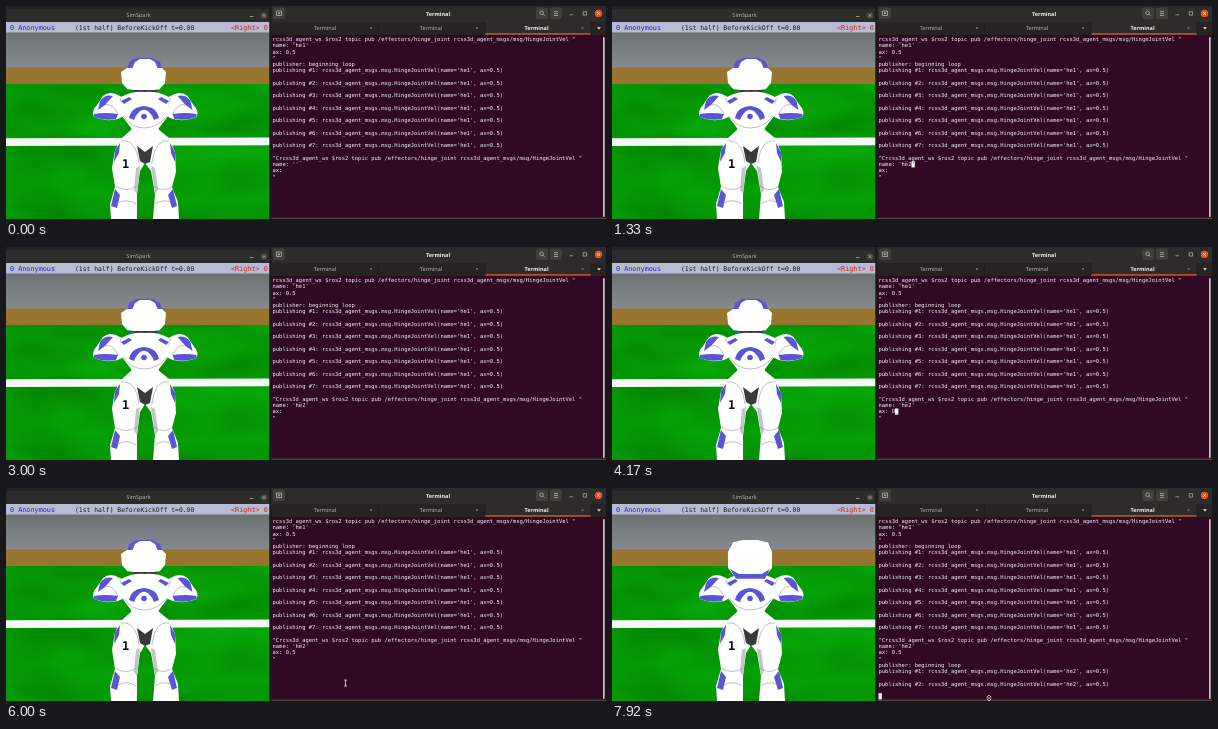
Animation, 600 px wide and 213 px high, one loop 8 s. Source, as an HTML page:

```html
<!DOCTYPE html>
<html lang="en">
<head>
<meta charset="utf-8">
<title>Hinge joint demo</title>
<style>
  html, body { margin: 0; width: 100%; height: 100%; overflow: hidden; background: #2b2929; }
  svg { display: block; width: 100%; height: 100%; }
  text { text-rendering: geometricPrecision; white-space: pre; }
  .mono { font-family: "DejaVu Sans Mono", monospace; }
  .term { font-size: 5.47px; fill: #f4eff3; }
  .ui { font: 5.5px "Noto Sans", sans-serif; fill: #b5b2af; text-anchor: middle; }
  .bold { font-weight: 700; fill: #f2f0ee; }
  .w { fill: #fff; }
  .b { fill: #5a55d2; }
  .s { fill: #c3c3cc; }
  .d { fill: #3a3a3e; }
  .line { fill: none; stroke: #7d7d86; stroke-width: .5; }
  .icon { fill: none; stroke: #c4c1be; stroke-width: .7; }
</style>
</head>
<body>
<svg viewBox="0 0 600 213" preserveAspectRatio="none">
  <defs>
    <linearGradient id="sky" x2="0" y2="1">
      <stop stop-color="#6c7174"/><stop offset="1" stop-color="#868b91"/>
    </linearGradient>
    <filter id="grass" x="0" y="0" width="1" height="1" color-interpolation-filters="sRGB">
      <feTurbulence type="fractalNoise" baseFrequency=".012 .03" numOctaves="2" seed="4"/>
      <feColorMatrix values=".04 0 0 0 0  .2 0 0 0 .5  .04 0 0 0 0  0 0 0 0 1"/>
    </filter>
    <clipPath id="view"><rect y="16" width="263.5" height="197"/></clipPath>
  </defs>

  <!-- simulator -->
  <rect width="600" height="213" fill="#242222"/>
  <rect y="3" width="264" height="14" fill="#2d2b2b"/>
  <text class="ui" x="132.5" y="11.4">SimSpark</text>
  <circle cx="258" cy="9.5" r="3.2" fill="#4a4747"/>
  <path class="icon" d="M244 10.5h3.5M256.8 8.3l2.4 2.4m0-2.4l-2.4 2.4"/>
  <g clip-path="url(#view)">
    <rect y="26" width="264" height="36" fill="url(#sky)"/>
    <rect y="61.5" width="264" height="17" fill="#98752f"/>
    <rect y="78" width="264" height="135" filter="url(#grass)"/>
    <path d="M0 132.3L264 131.6V139.3L0 140z" fill="#f6faf6"/>
    <rect y="16" width="264" height="10.5" fill="#b8bcd2"/>
    <g class="mono">
      <text x="4" y="24" font-size="6.8" fill="#2424d0">0 Anonymous</text>
      <text x="69" y="24" font-size="6.4" fill="#18181c">(1st half) BeforeKickOff t=0.00</text>
      <text x="225" y="24" font-size="6.8" fill="#d21f26">&lt;Right&gt; 0</text>
    </g>

    <!-- neck, arms -->
    <path class="d" d="M126 80H152L149 91H130z"/>
    <g id="arm">
      <path class="w" d="M97 90Q104 84 114 90L124 96L122 108L112 113Q99 116 88 111Q85 105 91 99z"/>
      <path class="b" d="M94 95Q99 88 107 90L99 99L92 104zM88 108Q99 106 112 108L110 113Q98 115 88 111z"/>
      <path class="line" d="M99 99Q106 96 112 108M114 92L118 105"/>
    </g>
    <use href="#arm" transform="matrix(-1 0 0 1 278.5 0)"/>

    <!-- torso -->
    <path class="w" d="M115 91Q126 85 139 86Q152 85 163 91L162 110L153 122L151 130H127L125 122L116 110z"/>
    <path class="b" d="M123 112Q125 101 138 100Q151 101 153 112L148 114Q145 105 138 105Q131 105 128 114z"/>
    <circle class="w" cx="138" cy="110" r="6.2"/>
    <circle class="b" cx="138" cy="110.5" r="2.8"/>
    <path class="b" d="M115 95L123 91L126 93L118 98zM163 95L155 91L152 93L160 98z"/>
    <path class="line" d="M117 110Q126 122 138 122Q151 122 161 110M126 124H152"/>

    <!-- pelvis and legs -->
    <path class="w" d="M126 123H152L163 132L169 146L170 166L166 181L172 196L173 213H147L149 188L145 165L139 157L134 165L131 188L131 213H105L104 198L109 181L106 162L109 144L116 132z"/>
    <path class="s" d="M134 160L131 188L128 184L130 162zM145 160L149 188L152 184L149 162z"/>
    <path class="b" d="M109 144L114 137L113 147L108 156zM169 146L164 137L165 147L169 156zM109 183L114 189L111 202L105 200zM167 183L162 189L166 202L171 200z"/>
    <path class="d" d="M131 140L139 146L147 140L144 156L139 158L134 155z"/>
    <path class="line" d="M115 135Q130 133 133 157M163 135Q149 133 146 157M109 180Q120 187 131 180M148 180Q157 187 167 180M112 197Q121 192 130 198M149 198Q158 192 166 197"/>
    <text class="mono" x="116" y="162" font-size="12" font-weight="700" fill="#0b0b0b">1</text>

    <!-- head parts get their points from the tilt -->
    <g id="head" stroke-linejoin="round"></g>
  </g>

  <!-- terminal -->
  <rect x="263.5" width="2" height="213" fill="#1b1919"/>
  <rect x="265.5" width="334.5" height="17" fill="#2d2b2b"/>
  <text class="ui bold" x="432" y="9.6">Terminal</text>
  <g fill="#413e3e">
    <rect x="267" y="1.5" width="12" height="11.5" rx="2"/>
    <rect x="530" y="1.5" width="12" height="11.5" rx="2"/>
    <rect x="544" y="1.5" width="12" height="11.5" rx="2"/>
  </g>
  <path class="icon" d="M270.5 5h5v4.5h-5zM273 6v2.5M271.8 7.2h2.5M537 8.2l1.6 1.6M548 5.5h4m-4 2h4m-4 2h4M563.5 8.8h3.5M577.2 5.7h3.4v3.4h-3.4z"/>
  <circle class="icon" cx="535.6" cy="6.8" r="1.8"/>
  <circle cx="592.5" cy="7.4" r="3.7" fill="#e2562a"/>
  <path class="icon" style="stroke:#fff" d="M591.2 6.1l2.6 2.6m0-2.6l-2.6 2.6"/>
  <rect x="265.5" y="16" width="334.5" height="13" fill="#252323"/>
  <rect x="479" y="16" width="106" height="13" fill="#2e2b2b"/>
  <path d="M372.5 16v12M479 16v12M585 16v12" stroke="#1c1a1a" stroke-width=".6"/>
  <rect x="479.5" y="27.2" width="105" height="1.4" fill="#d9532a"/>
  <text class="ui" x="319" y="24">Terminal</text>
  <text class="ui" x="425" y="24">Terminal</text>
  <text class="ui bold" x="530.5" y="24">Terminal</text>
  <path class="icon" style="stroke:#8a8785" d="M364 21l2 2m0-2l-2 2M470 21l2 2m0-2l-2 2M575.5 21l2 2m0-2l-2 2"/>
  <path d="M591 21.2h4l-2 2.4z" fill="#e4e1de"/>
  <rect x="265.5" y="29" width="334.5" height="184" fill="#300a24"/>
  <rect x="265.5" y="211.6" width="334.5" height="1.4" fill="#4a4548"/>
  <rect x="597" y="31" width="1.7" height="180" rx=".8" fill="#c9c2c7"/>
  <g id="screen" class="mono term"></g>
  <rect id="cursor" width="3.4" height="6.2" fill="#f7f4f6"/>
  <text id="under" class="mono term" style="fill:#300a24"></text>
  <g id="mouse" fill="none" stroke="#e8e4e7" stroke-width=".8">
    <path id="beam" d="M-1.5 -3H1.5M0 -3V3M-1.5 3H1.5"/>
    <path id="resize" d="M-2 -1L0 -3L2 -1M-2 1L0 3L2 1M-2.5 0H2.5"/>
  </g>
</svg>
<script>
const LOOP = 8000, STEP = 1000 / 12;
const LEFT = 266.5, TOP = 35.1, CELL = 3.293, ROW = 6.25, ROWS = 29;
const $ = id => document.getElementById(id);

function add(parent, tag, attrs) {
  const node = document.createElementNS(parent.namespaceURI, tag);
  for (const key in attrs) node.setAttribute(key, attrs[key]);
  return parent.appendChild(node);
}

const command = 'rcss3d_agent_ws $ros2 topic pub /effectors/hinge_joint rcss3d_agent_msgs/msg/HingeJointVel "';
const message = (n, joint) =>
  `publishing #${n}: rcss3d_agent_msgs.msg.HingeJointVel(name='${joint}', ax=0.5)`;

const START = 6580;
// time, typed joint, typed speed, cursor row, cursor column
const keys = [
  [-600, '', '', 20, 7],
  [660, 'h', '', 20, 8],
  [910, 'he', '', 20, 9],
  [1160, 'he2', '', 20, 10],
  [3650, 'he2', '', 21, 4],
  [4050, 'he2', '0', 21, 5],
  [4300, 'he2', '0.', 21, 6],
  [4550, 'he2', '0.5', 21, 7],
  [5330, 'he2', '0.5', 22, 1],
  [6420, 'he2', '0.5', 23, 0]
];

const lines = Array.from({ length: ROWS }, (_, row) =>
  add($('screen'), 'text', { x: LEFT, y: TOP + row * ROW }));

function drawTerminal(t) {
  const [pressed, joint, speed, keyRow, col] = keys.filter(k => k[0] <= t).pop();
  const rows = Array(ROWS).fill('');
  rows.splice(0, 5, command, "name: 'he1'", 'ax: 0.5', '"', 'publisher: beginning loop');
  for (let n = 1; n <= 7; n++) rows[3 + 2 * n] = message(n, 'he1');
  rows.splice(19, 4, '^C' + command, `name: '${joint}'`, 'ax: ' + speed, '"');

  let row = keyRow;
  if (t >= START) {
    rows[23] = rows[4];
    row = 24;
    const sent = Math.floor((t - START - 80) / 1000) + 1;
    for (let n = 1; n <= sent; n++) {
      rows[22 + 2 * n] = message(n, 'he2');
      row = 24 + 2 * n;
    }
  }
  lines.forEach((line, i) => {
    if (line.textContent !== rows[i]) line.textContent = rows[i];
  });

  const lit = (t - pressed) % 1200 < 600;
  const x = LEFT + col * CELL, y = TOP + row * ROW;
  $('cursor').setAttribute('visibility', lit ? 'visible' : 'hidden');
  $('cursor').setAttribute('x', x);
  $('cursor').setAttribute('y', y - 4.9);
  $('under').setAttribute('x', x);
  $('under').setAttribute('y', y);
  $('under').textContent = lit ? rows[row][col] || '' : '';
}

// fill, points looking ahead, points fully tilted
const headParts = [
  ['#5a55d2',
    [121, 65, 123, 56, 130, 52, 147, 52, 154, 56, 157, 65],
    [118, 68, 118, 57, 125, 53, 151, 53, 159, 57, 159, 68]],
  ['#fff',
    [115, 66, 121, 62, 156, 62, 160, 66, 159, 77, 153, 84, 122, 84, 116, 77],
    [116, 64, 121, 54, 156, 54, 160, 64, 160, 80, 154, 88, 122, 88, 116, 80]],
  ['#fff',
    [126, 63, 129, 56, 134, 53, 144, 53, 149, 56, 152, 63],
    [121, 60, 122, 54, 131, 52, 146, 52, 154, 54, 156, 60]],
  ['#5a55d2',
    [121, 83, 128, 84, 148, 84, 154, 83, 153, 84, 122, 84],
    [118, 81, 127, 86, 150, 86, 158, 81, 153, 91, 124, 91]]
];
const headNodes = headParts.map(([fill]) => add($('head'), 'polygon', { fill }));

function drawHead(t) {
  const elapsed = Math.max(0, t - START) / (LOOP - START);
  const tilt = Math.pow(elapsed, .7);
  headParts.forEach(([, from, to], i) =>
    headNodes[i].setAttribute('points', from.map((v, j) => v + (to[j] - v) * tilt).join(' ')));
}

function drawMouse(t) {
  const p = Math.min(1, Math.max(0, (t - 6100) / 500));
  const ease = p * p * (3 - 2 * p);
  $('mouse').setAttribute('visibility', t < 5650 ? 'hidden' : 'visible');
  $('mouse').setAttribute('transform', `translate(${339.5 + 37.5 * ease} ${195 + 15 * ease})`);
  $('beam').style.display = p < 1 ? '' : 'none';
  $('resize').style.display = p < 1 ? 'none' : '';
}

function frame() {
  const t = Math.floor(performance.now() % LOOP / STEP) * STEP;
  drawTerminal(t);
  drawHead(t);
  drawMouse(t);
  requestAnimationFrame(frame);
}
frame();
</script>
</body>
</html>
```
